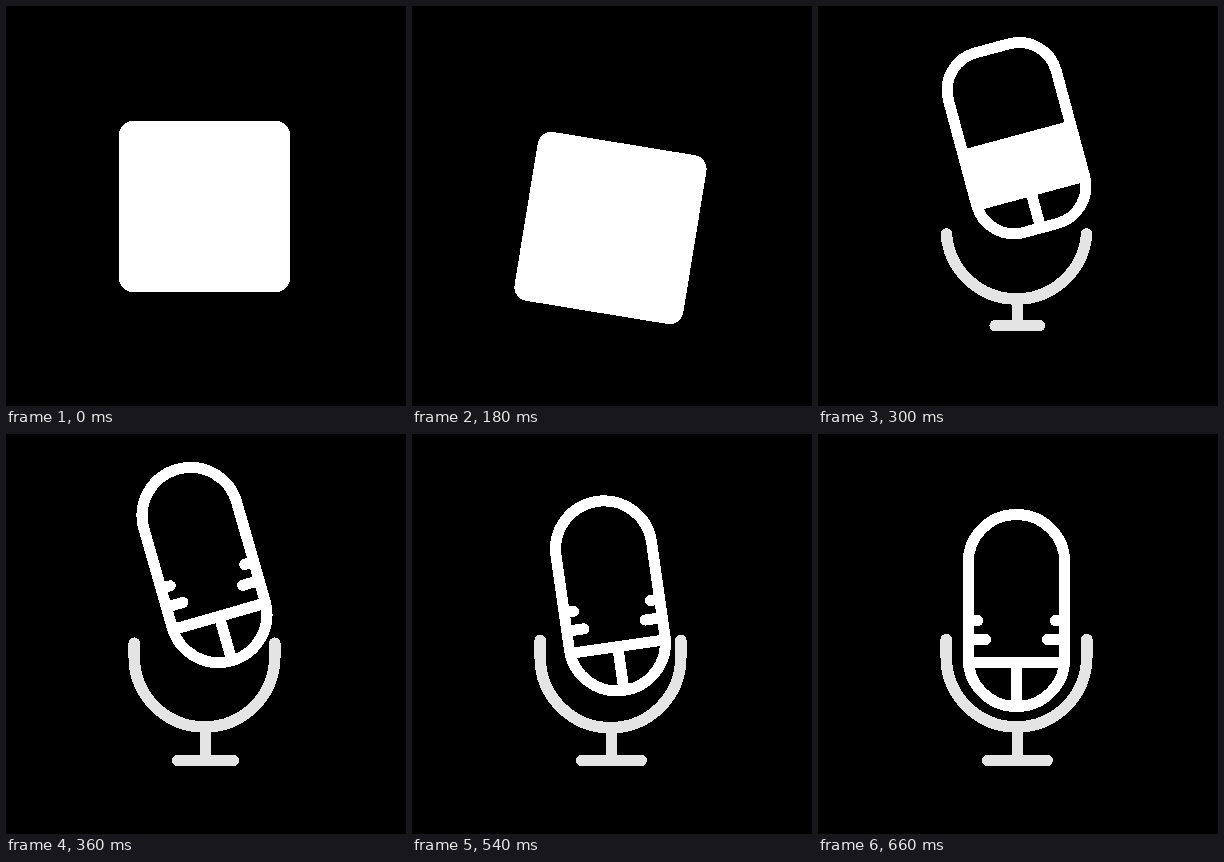
An HTML page for the animation above (1.69 s loop, 400 px wide and 400 px high).

```html
<!DOCTYPE html>
<html lang="en">
<head>
<meta charset="utf-8">
<title>Microphone</title>
<style>
  html, body { margin: 0; width: 100%; height: 100%; overflow: hidden; background: #000; }
  svg { display: block; width: 100%; height: 100%; }
</style>
</head>
<body>
<svg viewBox="0 0 400 400" shape-rendering="crispEdges">
  <g id="stand" fill="none" stroke="#e4e4e4" stroke-width="11.5" stroke-linecap="round">
    <path id="cradle"/>
    <path id="foot" stroke-width="11"/>
  </g>
  <g id="mic" fill="none" stroke="#fff" stroke-width="11">
    <rect id="shell"/>
    <rect id="band" fill="#fff" stroke="none"/>
    <path id="divider"/>
    <path id="ribs" stroke-linecap="round"/>
  </g>
</svg>
<script>
const LOOP = 1690, STEP = 30;
// The square dips, leaps while turning into a microphone, falls and rebounds.
const LEAP = 180, PEAK = 360, LAND = 570, REST = 660;
const CX = 198.5, FOOT_X = 199.4;
const CRADLE_Y = 222.7, CRADLE_R = 70.3;

const el = id => document.getElementById(id);
const mix = (a, b, p) => a + (b - a) * p;
const phase = (t, from, to) => Math.min(1, Math.max(0, (t - from) / (to - from)));
const easeOut = (u, power) => 1 - (1 - u) ** power;
const smooth = u => u * u * (3 - 2 * u);
const easeInOutCubic = u => u < 0.5 ? 4 * u ** 3 : 1 - 4 * (1 - u) ** 3;

function setAttrs(id, attrs) {
  for (const name in attrs) el(id).setAttribute(name, attrs[name]);
}

function drawMic(t) {
  const dip = smooth(phase(t, 0, LEAP));
  const leap = phase(t, LEAP, PEAK);
  const drop = phase(t, PEAK, LAND), fall = drop ** 3.5;
  const rebound = smooth(phase(t, LAND, REST));

  const y = mix(mix(200.5, 222, dip), 131, easeOut(leap, 4)) + 53 * fall - 7.5 * rebound;
  const angle = mix(9.3 * dip, -16, easeOut(leap, 3)) + 11.8 * drop ** 2.6 + 4.2 * rebound;
  const morph = easeOut(leap, 1.3);
  const w = mix(160, 96.5, morph);
  const h = mix(160, 199, leap) - 14 * fall + 7 * rebound;
  const bandTop = h * mix(-0.47, 0.24, leap ** 1.1);
  const bandBottom = h * mix(0.47, 0.297, easeInOutCubic(leap));

  setAttrs("mic", { transform: `translate(${CX} ${y}) rotate(${angle})` });
  setAttrs("shell", { x: -w / 2, y: -h / 2, width: w, height: h, rx: mix(8.5, 48, morph) });
  setAttrs("band", { x: -w / 2, y: bandTop, width: w, height: bandBottom - bandTop });
  setAttrs("divider", { d: `M0 ${bandBottom}V${h / 2}` });

  const ribPair = (ribY, tip) => `M${-w / 2} ${ribY}H${-tip}M${w / 2} ${ribY}H${tip}`;
  setAttrs("ribs", { d: ribPair(h * 0.053, 38.7) + ribPair(h * 0.151, 31) });
}

// The cradle grows from its lowest point along the arc, then up both arms.
function cradlePath(length, sag) {
  const r = CRADLE_R, quarter = r * Math.PI / 2;
  const a = Math.min(length, quarter) / r;
  const dx = r * Math.sin(a), y = CRADLE_Y + sag + r * Math.cos(a);
  const tip = y - Math.max(0, length - quarter);
  return `M${CX - dx} ${tip}V${y}A${r} ${r} 0 0 0 ${CX + dx} ${y}V${tip}`;
}

function drawStand(t) {
  const leap = phase(t, LEAP, PEAK);
  const sway = 3.5 * Math.sin(2 * Math.PI * (t - 420) / 240);
  const length = 124 * easeOut(leap, 1.72) + (t > PEAK ? 3.5 + sway : 0);
  const sag = 1.3 * (phase(t, PEAK, LAND) ** 3.5 - smooth(phase(t, LAND, REST)));
  const top = CRADLE_Y + CRADLE_R;
  const bottom = top + 33.5 * easeOut(leap, 1.45);
  const half = 30 * easeOut(phase(t, LEAP, 420), 2);

  setAttrs("stand", { visibility: t > LEAP ? "visible" : "hidden" });
  setAttrs("cradle", { d: cradlePath(length, sag) });
  setAttrs("foot", { d: `M${FOOT_X} ${top}V${bottom}M${FOOT_X - half} ${bottom}h${2 * half}` });
}

function render(ms) {
  const t = Math.min(REST, Math.floor((ms % LOOP) / STEP) * STEP);
  drawStand(t);
  drawMic(t);
}

const start = performance.now();
function tick() {
  render(performance.now() - start);
  requestAnimationFrame(tick);
}
tick();
</script>
</body>
</html>
```
